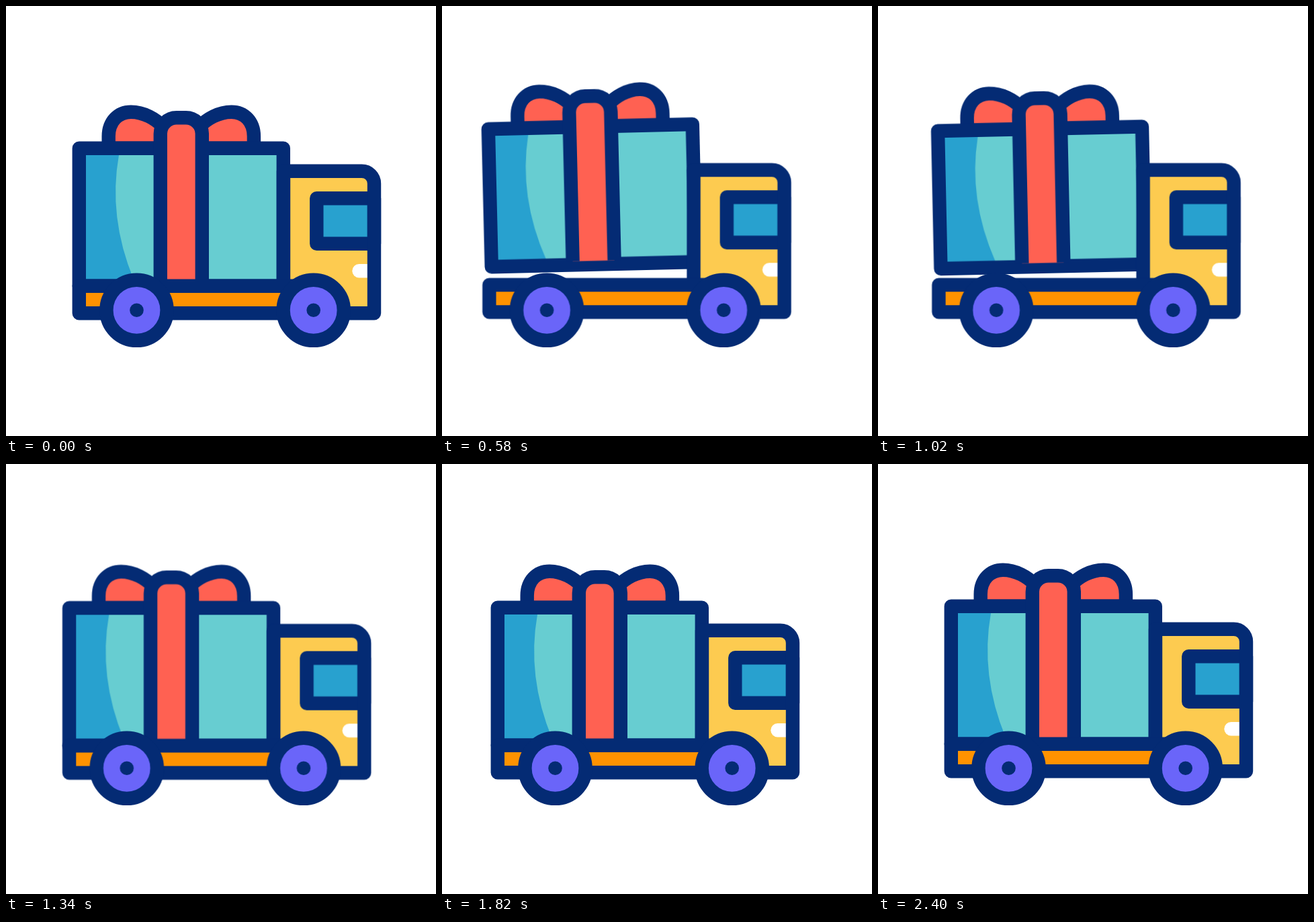
An HTML page without scripts that plays this animation: 640 by 640 pixels, repeating every 2420 ms.

```html
<!DOCTYPE html>
<html lang="en">
<head>
<meta charset="utf-8">
<title>Gift delivery truck</title>
<style>
  html, body { margin: 0; width: 100%; height: 100%; overflow: hidden; background: #fff; }
  svg { display: block; width: 100%; height: 100%; }

  .line { stroke: #042b74; stroke-width: 20.4; stroke-linejoin: round; }
  .navy { fill: #042b74; }
  .teal { fill: #67cdd1; }
  .blue { fill: #28a1cf; }
  .red { fill: #ff6152; }
  .orange { fill: #ff9200; }
  .yellow { fill: #fdcb50; }
  .purple { fill: #6a65f9; }
  .none { fill: none; }

  svg { --loop: 2420ms; }
  .truck { animation: drive var(--loop) cubic-bezier(.333, 0, .667, 1) infinite; }
  .body { animation: rattle calc(var(--loop) / 11) ease-in-out infinite; }
  .gift { animation: jump var(--loop) infinite; transform-origin: 260.8px 275px; }

  @keyframes drive {
    0%, 99.2%, 100% { transform: none; }
    24.8% { transform: translateX(-38.6px); }
    49.6% { transform: translateX(-12.9px); }
    74.4% { transform: translateX(-26.1px); }
  }

  @keyframes rattle {
    0%, 91%, 100% { transform: none; }
    10% { transform: translateY(2.5px); }
    36% { transform: translateY(1.8px); }
    80% { transform: translateY(-3px); }
  }

  @keyframes jump {
    0%, 22% {
      transform: translateY(0) rotate(0);
      animation-timing-function: cubic-bezier(.19, .72, .4, 1);
    }
    33% {
      transform: translateY(-58px) rotate(-2.6deg);
      animation-timing-function: cubic-bezier(.6, 0, .81, .28);
    }
    43.9%, 100% { transform: translateY(0) rotate(0); }
  }
</style>
</head>
<body>
<svg viewBox="0 0 640 640">
  <defs>
    <path id="loop" class="red line" d="M152.7 211.7V194C152.7 172 167 157.7 186 157.7C205 157.7 223 168 234 180V211.7Z"/>
    <rect id="box" x="108.8" y="211.7" width="304" height="205.1"/>
    <path id="cab" d="M413 245.7H529.5a18.5 18.5 0 0 1 18.5 18.5V457.3H413Z"/>
    <g id="wheel">
      <circle class="purple line" r="45.1"/>
      <circle class="navy" r="10.3"/>
    </g>
  </defs>

  <g class="truck">
    <g class="body">
      <g class="gift">
        <use href="#loop"/>
        <use href="#loop" transform="matrix(-1 0 0 1 521.6 0)"/>
        <use href="#box" class="teal"/>
        <path class="blue" d="M108.8 211.7V416.8H194L190 407Q151.6 314 168 222L170 211.7Z"/>
        <use href="#box" class="none line"/>
        <path class="red line" d="M229.8 411.5V190a24 24 0 0 1 24-23.7h14a24 24 0 0 1 24 23.7V411.5"/>
      </g>

      <use href="#cab" class="yellow"/>
      <rect class="blue line" x="462.3" y="286.2" width="85.7" height="67.6"/>
      <rect fill="#fff" x="515.3" y="384" width="40" height="20.4" rx="10.2"/>
      <use href="#cab" class="none line"/>
      <rect class="orange line" x="108.8" y="416.8" width="326" height="40.5"/>
    </g>

    <use href="#wheel" x="194.5" y="452.8"/>
    <use href="#wheel" x="457.7" y="452.8"/>
  </g>
</svg>
</body>
</html>
```
